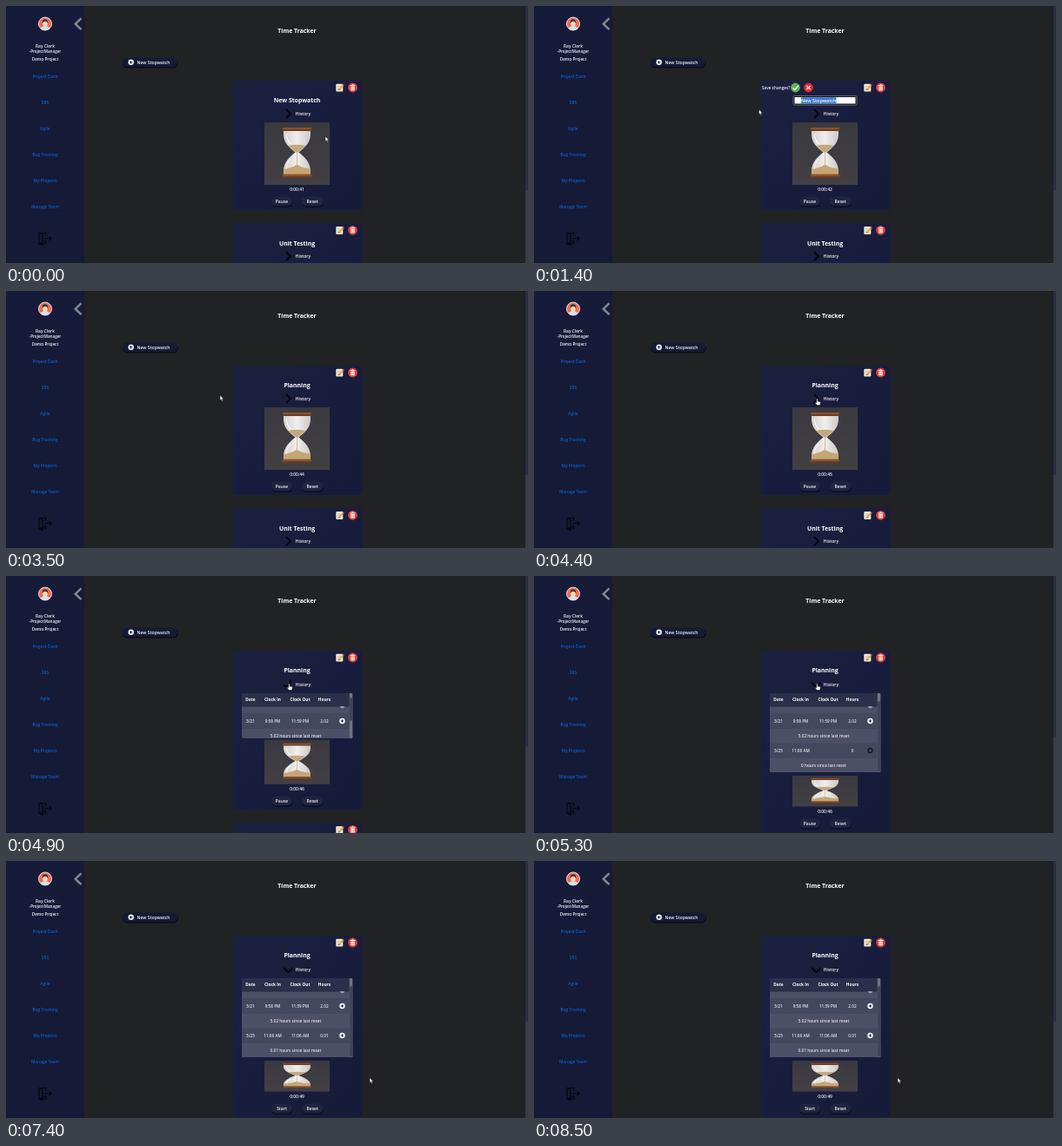
These frames come from a looping animation (600x296 px, 8.6 s). An HTML page:

```html
<!DOCTYPE html>
<html lang="en">
<head>
<meta charset="utf-8">
<title>Time Tracker</title>
<style>
  html, body { margin: 0; width: 100%; height: 100%; overflow: hidden; background: #202224; }
  svg { display: block; width: 100%; height: 100%; font-family: "Open Sans", "Noto Sans", sans-serif; }
  text { white-space: pre; }
</style>
</head>
<body>
<svg id="stage" viewBox="0 0 600 296"></svg>
<script>
const LOOP = 8600, STEP = 100;
const stage = document.getElementById('stage');

// x and y give the anchor and the vertical middle of the capitals
function label(x, y, str, { size = 4.9, weight = 600, fill = '#f2f2f5', anchor = 'middle', id = '' } = {}) {
  return `<text ${id && `id="${id}"`} x="${x}" y="${y + size * .36}" font-size="${size}"
    font-weight="${weight}" fill="${fill}" text-anchor="${anchor}">${str}</text>`;
}
const heading = (x, y, str, id) => label(x, y, str, { size: 6.9, weight: 700, fill: '#fff', id });
const rect = (x, y, w, h, fill, r = 0, id = '') =>
  `<rect ${id && `id="${id}"`} x="${x}" y="${y}" width="${w}" height="${h}" rx="${r}" fill="${fill}"/>`;
const line = (d, stroke, width, extra = '') => `<path d="${d}" fill="none" stroke="${stroke}" stroke-width="${width}" ${extra}/>`;
const shape = (d, fill) => `<path d="${d}" fill="${fill}"/>`;

const plus = (x, y, disc = '#fff', sign = '#151a35', id = '') =>
  `<g ${id && `id="${id}"`}><circle cx="${x}" cy="${y}" r="3.2" fill="${disc}"/>
   ${line(`M${x - 1.7} ${y}h3.4M${x} ${y - 1.7}v3.4`, sign, 1)}</g>`;

const button = (x, y, w, h, str, id) =>
  rect(x + .3, y + 1.3, w, h, '#080b1c', h / 2) + rect(x, y, w, h, '#20243e', h / 2, id && id + 'Face') +
  label(x + w / 2, y + h / 2, str, { size: 5, id });

const editIcon = `
  ${rect(379.3, 89.8, 8, 8.8, '#f3ead6', 1)}
  ${line('M380.8 92.5h4M380.8 94.5h3M380.8 96.5h4.5', '#a9a296', .6)}
  ${line('M383 96.2L387.6 91.2', '#e3a634', 1.7)}
  ${line('M387.2 91.6L388.3 90.4', '#d9574b', 1.8)}
  ${line('M382.3 97L383.2 96', '#3a2d20', 1)}`;

const trashIcon = `
  <circle cx="398.5" cy="94" r="5.4" fill="#e23f36"/>
  ${rect(396.3, 92.4, 4.4, 4.8, '#fff', .6)}
  ${line('M395.6 91.5h5.8M397.6 90.6h1.8', '#fff', .9)}
  ${line('M397.6 93.2v3.2M399.4 93.2v3.2', '#e23f36', .5)}`;

const chevron = id => line('M321.8 118.8L327 124L321.8 129.2', '#05060c', 1.9, id && `id="${id}"`);

const cardHead = (title, titleId, chevronId) => `${editIcon}${trashIcon}
  ${heading(334.5, 109, title, titleId)}
  <g ${titleId && 'id="history"'}>${chevron(chevronId)}${label(341.5, 124, 'History', { size: 5 })}</g>`;

const hourglass = `
  ${rect(297, 134, 75, 72, 'url(#photo)')}
  ${shape('M319 143V148C319 158 326 163 332.6 168.5C326 174 319 180 319 190V194H350V190C350 180 343 174 336.4 168.5C343 163 350 158 350 148V143Z', 'url(#glass)')}
  ${shape('M324.5 161Q334.5 158.5 344.5 161Q340 165 335.5 168.6H333.5Q329 165 324.5 161Z', '#c2a87c')}
  ${shape('M319.2 194V187.5Q328 187 334.5 182.5Q341 187 349.8 187.5V194Z', '#c4a673')}
  ${line('M334.5 168V183', '#c9a76a', .7)}
  ${line('M322 147Q322.5 154 327 159M322 188Q322.5 181 327 176', '#fff', 1.3, 'opacity=".75"')}
  ${[140, 193.8].map(y => rect(317.7, y, 33.6, 3.9, '#6f3c22', 1) + rect(318.4, y + .6, 32.2, 1, '#a9683a', .5)).join('')}`;

const columns = [281, 306.5, 338, 366];
const cells = (y, values, style) => values.map((v, i) => label(columns[i], y, v, style)).join('');
const small = { size: 4.7, weight: 600, fill: '#e4e4ea' };

const table = `<g clip-path="url(#fold)">
  ${rect(271, 135, 127.5, 92, '#44485f')}
  ${rect(271, 151, 127.5, 7, '#4c4f66')}${rect(271, 176, 127.5, 16.5, '#4c4f66')}${rect(271, 210, 127.5, 17, '#4c4f66')}
  ${plus(386.5, 148.4)}
  ${rect(271, 135, 127.5, 15.5, '#2b2f49')}
  ${cells(142.5, ['Date', 'Clock In', 'Clock Out', 'Hours'], { size: 4.8, weight: 700, fill: '#fff' })}
  ${cells(167, ['3/21', '9:58 PM', '11:59 PM', '2.02'], small)}${plus(386.5, 167)}
  ${label(333, 184, '5.02 hours since last reset', small)}
  ${cells(201.5, ['3/25', '11:06 AM'], small)}
  ${label(338, 201.5, '', { ...small, id: 'clockOut' })}
  ${label(366, 201.5, '0', { ...small, id: 'hours' })}
  ${plus(386.5, 201, '#191b25', '#5d5f6a', 'addDim')}${plus(386.5, 201, '#fff', '#151a35', 'addLit')}
  ${label(333, 218.8, '', { ...small, id: 'total' })}
  ${rect(394.8, 135, 3.7, 92, '#717383')}${rect(394.8, 135, 3.7, 0, '#414459', 0, 'tableThumb')}
</g>`;

const editor = `<g id="editor">
  ${label(262, 94, 'Save changes?', { size: 4.7, anchor: 'start' })}
  <circle cx="300.5" cy="94" r="5.4" fill="#5bb24c"/>${line('M297.4 94.2L299.8 96.5L303.8 91.8', '#fff', 1.5)}
  <circle cx="315.5" cy="94" r="5.4" fill="#e02c26"/>${line('M313.4 91.9l4.2 4.2m0-4.2l-4.2 4.2', '#fff', 1.4)}
  <rect x="298.7" y="104.2" width="71.6" height="9.2" rx="1" fill="#fff" stroke="#101010" stroke-width="1.6"/>
  <rect x="298" y="103.5" width="73" height="10.6" rx="1.4" fill="none" stroke="#b5b5b5" stroke-width=".5"/>
  <rect id="selection" y="105.2" height="7.2" fill="#3878d4"/>
  ${label(307, 109, '', { size: 5.4, fill: '#15161c', anchor: 'start', id: 'typed' })}
  <rect id="caret" y="105.8" width=".5" height="6.2" fill="#111"/>
</g>`;

const links = ['Project Dash', 'SRS', 'Agile', 'Bug Tracking', 'My Projects', 'Manage Team'];
const sidebar = `${rect(0, 0, 90, 296, 'url(#side)')}
  <circle cx="45" cy="20.5" r="7.5" fill="#ee6a50" stroke="#f3e9e4" stroke-width="1"/>
  ${shape('M39.4 25.4Q45 20.8 50.6 25.4Q48.5 28 45 28Q41.5 28 39.4 25.4Z', '#cfe2f0')}
  <ellipse cx="45" cy="20.2" rx="2.8" ry="3.5" fill="#f8d4bd"/>
  ${shape('M41.9 20Q41.2 15.2 45 15.2Q48.8 15.2 48.1 20Q47 17.6 45 17.8Q43 17.6 41.9 20Z', '#3a3140')}
  ${line('M86.5 14.2L79.8 20.7L86.5 27.2', '#85878d', 2.5)}
  ${label(45, 46, 'Ray Clerk')}${label(45, 52, '-ProjectManager', { size: 4.6 })}${label(45, 61.3, 'Demo Project', { size: 4.7 })}
  ${links.map((name, i) => label(45, 81.6 + 29.9 * i, name, { fill: '#0a5fcb', size: 4.8 })).join('')}
  ${line('M38 261.5H45.7V264.8M45.7 270.5V274H38ZM38 261.5L42 263.3V275.6L38 274ZM44 267.7H52M49.6 265.2L52.2 267.7L49.6 270.2', '#05060c', 1.1)}`;

const cursors = `
  <path id="arrow" d="M0 0V6L1.4 4.8L2.3 6.9L3.3 6.4L2.4 4.4H4.2Z" fill="#fff" stroke="#111" stroke-width=".5"/>
  <path id="hand" d="M-.7 .6Q0-.5 .7 .6V3L3.3 3.6Q4 3.9 3.8 4.8L3.2 7.5H-.4L-2.3 4.7Q-2.1 3.7-.7 4.6Z" fill="#fff" stroke="#111" stroke-width=".5"/>`;

const gradient = (id, x2, y2, ...colors) => `<linearGradient id="${id}" x2="${x2}" y2="${y2}">
  ${colors.map((c, i) => `<stop offset="${i / (colors.length - 1)}" stop-color="${c}"/>`).join('')}</linearGradient>`;

stage.innerHTML = `<defs>
  ${gradient('side', 0, 1, '#161b39', '#151a36')}
  ${gradient('card', 1, 1, '#1d2140', '#191d3d', '#171b3a')}
  ${gradient('photo', 0, 1, '#3a393f', '#424045')}
  ${gradient('glass', 1, 0, '#d3cfcd', '#f1efee', '#cbc7c5')}
  <clipPath id="fold"><rect id="foldBox" x="271" y="135" width="127.5" rx="1.5"/></clipPath></defs>
  ${rect(0, 0, 600, 296, '#202224')}${sidebar}
  ${rect(597, 0, 3, 296, '#2a2d45')}${rect(597, 0, 3, 120, '#393d43', 0, 'pageThumb')}
  ${heading(334.5, 28.3, 'Time Tracker')}
  ${rect(134, 60.8, 64, 10.6, '#090c1c', 5.3)}${rect(134, 59.6, 63.3, 10.5, '#151a35', 5.2)}
  ${plus(143.7, 64.8)}${label(169.5, 64.8, 'New Stopwatch', { size: 5.1 })}
  ${rect(260, 86, 150, 149, 'url(#card)', 4, 'cardBox')}
  ${cardHead('New Stopwatch', 'title', 'chevron')}${editor}${table}
  <g id="glassBox">${hourglass}</g>
  <g id="controls">${label(334.5, 211.5, '', { size: 4.9, id: 'timer' })}
    ${button(305, 219.5, 24, 11, 'Pause', 'toggle')}${button(340, 219.5, 24.5, 11, 'Reset')}</g>
  <g id="nextCard"><g transform="translate(0 164.3)">${rect(260, 86, 150, 149, 'url(#card)', 4)}${cardHead('Unit Testing', '', '')}</g></g>
  <g id="cursor">${cursors}</g>`;

const el = {};
stage.querySelectorAll('[id]').forEach(node => el[node.id] = node);
const set = (id, attrs) => { for (const k in attrs) el[id].setAttribute(k, attrs[k]); };
const write = (id, str) => { if (el[id].textContent !== str) el[id].textContent = str; };
const show = (id, on) => set(id, { visibility: on ? 'inherit' : 'hidden' });
const smooth = x => { x = Math.min(1, Math.max(0, x)); return x * x * (3 - 2 * x); };
const between = (t, a, b) => t >= a && t < b;

// time, x, y of the pointer tip
const path = [
  [0, 367, 150], [200, 367, 150], [700, 384, 93], [1000, 384, 93], [1100, 352, 109], [1400, 258.5, 119],
  [1600, 246, 120], [3700, 246, 120], [4200, 325.5, 124], [5500, 325.5, 124], [6200, 318, 287],
  [6800, 318, 287], [7200, 418, 249.5], [LOOP, 418, 249.5]
];
function pointer(t) {
  const i = path.findIndex(p => p[0] > t), [t0, x0, y0] = path[i - 1], [t1, x1, y1] = path[i];
  const k = smooth((t - t0) / (t1 - t0));
  return [x0 + (x1 - x0) * k, y0 + (y1 - y0) * k];
}

const keyTimes = [2200, 2400, 2600, 2800, 2900, 3000, 3100, 3200];
const tableContent = 102, tableScroll = 10.5;

function draw(t) {
  const [px, py] = pointer(t);
  const open = smooth((t - 4600) / 550);
  const paused = t >= 7200;

  set('cursor', { transform: `translate(${px} ${py})` });
  const onToggle = between(t, 6100, 6900);
  const pointing = onToggle || between(t, 600, 1100) || between(t, 4100, 5600);
  show('hand', pointing);
  show('arrow', !pointing);
  set('toggleFace', { fill: onToggle ? '#3c4059' : '#20243e' });

  const editing = between(t, 800, 3500);
  const keys = keyTimes.filter(k => k <= t).length;
  show('editor', editing);
  show('title', !editing);
  write('title', t < 3500 ? 'New Stopwatch' : 'Planning');
  write('typed', keys ? 'Planning'.slice(0, keys) : 'New Stopwatch');
  const textWidth = el.typed.getComputedTextLength(), textEnd = 307 + textWidth;
  const selectFrom = t < 1100 ? textEnd : Math.min(textEnd, Math.max(307, px));
  const selected = keys ? 0 : textEnd - selectFrom;
  set('selection', { x: selectFrom, width: selected });
  set('typed', { fill: selected > textWidth / 2 ? '#fff' : '#15161c' });
  set('caret', { x: textEnd + .2 });
  show('caret', editing && !selected);

  const tableHeight = 91 * open, thumbScale = tableHeight / tableContent;
  set('foldBox', { height: tableHeight });
  set('tableThumb', { y: 135 + tableScroll * thumbScale, height: tableHeight * thumbScale });
  set('history', { transform: `translate(0 ${1.6 * open})` });
  set('chevron', { transform: `rotate(${90 * open} 324.4 124)` });
  set('cardBox', { height: 149 + 60 * open });
  set('glassBox', { transform: `translate(0 ${134 + 96 * open}) scale(1 ${1 - .507 * open}) translate(0 -134)` });
  set('controls', { transform: `translate(0 ${60 * open})` });
  set('nextCard', { transform: `translate(0 ${60 * open})` });
  set('pageThumb', { y: 212 - 27 * open });

  write('timer', '0:00:' + (41 + Math.min(8, Math.floor((t + 160) / 920))));
  write('toggle', paused ? 'Start' : 'Pause');
  write('clockOut', paused ? '11:06 AM' : '');
  write('hours', paused ? '0.01' : '0');
  write('total', `${paused ? '0.01' : '0'} hours since last reset`);
  show('addLit', paused);
  show('addDim', !paused);
}

const start = performance.now();
function tick() {
  const t = (performance.now() - start) % LOOP;
  draw(Math.floor(t / STEP) * STEP);
  requestAnimationFrame(tick);
}
tick();
</script>
</body>
</html>
```
